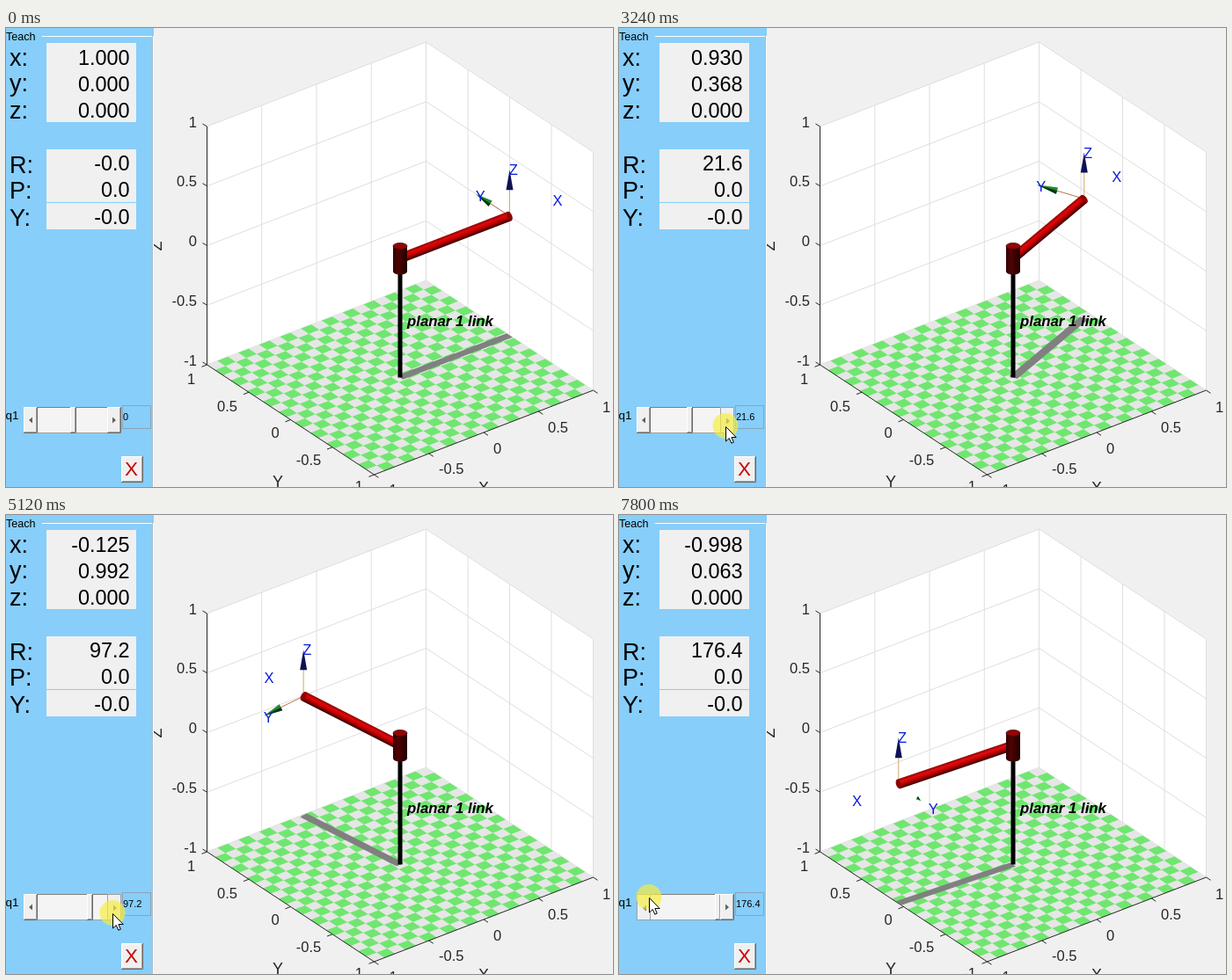
Animation of 690x522 px, one loop 8 s. Source, as an HTML page:

```html
<!DOCTYPE html>
<html lang="en">
<head>
<meta charset="utf-8">
<title>One-link arm</title>
<style>
html, body { margin: 0; width: 100%; height: 100%; overflow: hidden; background: #f0f0f0; }
svg { display: block; width: 690px; height: 522px; font-family: "Liberation Sans", Arial, sans-serif; }
.tick { font-size: 16.5px; fill: #262626; }
.title { font-size: 18px; fill: #262626; }
.name { font-size: 27px; }
.num { font-size: 23.4px; text-anchor: end; }
.axis { font-size: 16.5px; fill: #0a1ed8; }
</style>
</head>
<body>
<svg id="stage" viewBox="0 0 690 522"></svg>
<script>
const LOOP = 8000;
const TILES = 21;

// Slider steps: [time, joint angle]
const STEPS = [
  [0, 0], [1850, 3.6], [2310, 7.2], [2640, 10.8], [2790, 14.4], [2940, 18], [3100, 21.6],
  [3260, 25.2], [3430, 28.8], [3710, 32.4], [3830, 39.6], [3980, 46.8], [4140, 54],
  [4310, 61.2], [4520, 68.4], [4650, 75.6], [4770, 82.8], [4900, 90], [5020, 97.2],
  [5180, 104.4], [5340, 111.6], [5460, 118.8], [5590, 126], [5720, 133.2], [5860, 140.4],
  [6010, 147.6], [6180, 154.8], [6320, 162], [6450, 169.2], [6590, 176.4]
];
const ARM_LAG = 30, TEXT_LAG = 85;

const PRESSES = [[1820, 1970], [2280, 2410], [2610, 7080], [7800, LOOP]];

// Pointer path: [time, x, y]
const POINTER = [
  [1220, 146, 508], [1360, 130, 473], [1500, 121, 453], [7060, 121, 453],
  [7180, 80, 441], [7300, 41, 433], [7440, 41, 433], [7620, 34, 435]
];

const $ = id => document.getElementById(id);
const set = (id, attrs) => { for (const k in attrs) $(id).setAttribute(k, attrs[k]); };
const project = (x, y, z) => [448 + 124.5 * x - 95 * y, 397.5 - 48 * x - 62.5 * y - 135.5 * (z + 1)];
const pathOf = (...pts) => 'M' + pts.map(p => p.map(n => n.toFixed(2)).join(' ')).join('L');
const along = (p, v, k) => [p[0] + v[0] * k, p[1] + v[1] * k];
const text = (x, y, s, cls = '', extra = '') => `<text x="${x}" y="${y}" class="${cls}" ${extra}>${s}</text>`;
const rect = (x, y, w, h, fill, extra = '') =>
  `<rect x="${x}" y="${y}" width="${w}" height="${h}" fill="${fill}" ${extra}/>`;
const line = (d, stroke, w = 1) => `<path d="${d}" fill="none" stroke="${stroke}" stroke-width="${w}"/>`;

function floor() {
  const size = 2 / TILES;
  let d = '';
  for (let i = 0; i < TILES; i++) {
    for (let j = 0; j < TILES; j++) {
      if ((i + j) % 2 === 0) continue;
      const x = i * size - 1, y = j * size - 1;
      d += pathOf(project(x, y, -1), project(x + size, y, -1),
        project(x + size, y + size, -1), project(x, y + size, -1)) + 'Z';
    }
  }
  const all = pathOf(project(-1, -1, -1), project(1, -1, -1), project(1, 1, -1), project(-1, 1, -1)) + 'Z';
  return `<path d="${all}" fill="#e6e6e6"/><path d="${d}" fill="#70e670"/>`;
}

function axes() {
  const walls = pathOf(project(-1, 1, -1), project(-1, 1, 1), project(1, 1, 1),
    project(1, -1, 1), project(1, -1, -1), project(1, 1, -1)) + 'Z';
  let grid = '', ticks = '', labels = '';
  for (let i = 0; i < 5; i++) {
    const v = i / 2 - 1, z = project(-1, 1, v), y = project(-1, v, -1), x = project(v, -1, -1);
    grid += pathOf(project(v, 1, -1), project(v, 1, 1)) + pathOf(project(1, v, -1), project(1, v, 1)) +
      pathOf(project(-1, 1, v), project(1, 1, v), project(1, -1, v));
    ticks += pathOf(z, [z[0] - 5, z[1] - 3]) + pathOf(y, [y[0] - 6, y[1] + 2.3]) + pathOf(x, [x[0] + 5, x[1] + 3.3]);
    labels += text(217, z[1] + .5, v, 'tick', 'text-anchor="end"') +
      text(406 - 47.7 * i, 527 - 30.4 * i, v, 'tick', 'text-anchor="end"') +
      text(430 + 62 * i, 531 - 23.6 * i, v, 'tick');
  }
  const edges = pathOf(project(-1, 1, 1), project(-1, 1, -1), project(-1, -1, -1), project(1, -1, -1));
  return `<path d="${walls}" fill="#fff"/>` + line(grid, '#dedede') + floor() +
    line(edges + ticks, '#262626') + labels +
    text(303, 522, 'Y', 'title') + text(537, 529, 'X', 'title') +
    text(0, 0, 'Z', 'title', 'transform="translate(176.5 253.5) rotate(-90)"');
}

function robot() {
  return `<path id="shadow" fill="#808080"/>` +
    line('M448 274V397.5', '#000', 5) +
    text(456, 339, 'planar 1 link', '', 'font-size="16.8" font-weight="bold" font-style="italic"') +
    `<path id="lineX" stroke="#3048d0"/>
    <path id="lineY" stroke="#b8704a"/>
    <path id="lineZ" stroke="#d0a868"/>
    <path id="coneX" fill="#d01010"/>
    <path id="coneY" fill="#1c8a2c"/><path id="sideY" fill="#0c3414"/>
    <path id="coneZ" fill="#101058"/>
    <g id="arm"><rect id="rod" y="-5.5" height="11" fill="url(#red)"/>
    <ellipse id="cap" rx="2.8" ry="5.5" fill="#8c0404"/></g>
    <path d="M440 248V277A8 3.5 0 0 0 456 277V248Z" fill="url(#maroon)"/>
    <ellipse cx="448" cy="248" rx="8" ry="3.6" fill="#900606" stroke="#400000" stroke-width=".7"/>` +
    ['X', 'Y', 'Z'].map(s => text(0, 0, s, 'axis', `id="tag${s}"`)).join('');
}

function bevel(x, y, w, h) {
  return rect(x, y, w, h, '#f0f0f0') +
    line(`M${x + .5} ${y + h - 1}V${y + .5}H${x + w - 1}`, '#fff') +
    line(`M${x + w - 1.5} ${y + 1}V${y + h - 1.5}H${x + 1}`, '#a0a0a0') +
    line(`M${x + w - .5} ${y}V${y + h - .5}H${x}`, '#696969');
}

// Slider end button with a raised and a pressed face; dir is the arrow's direction
function arrowButton(id, x, dir) {
  const arrow = (cx, cy) =>
    `<path d="M${cx - 2 * dir} ${cy - 3.5}V${cy + 3.5}L${cx + 2 * dir} ${cy}Z" fill="#606060"/>`;
  return bevel(x, 431, 16, 30) + arrow(x + 8, 446) +
    `<g id="${id}">${rect(x + .5, 431.5, 15, 29, '#f0f0f0', 'stroke="#a0a0a0"')}${arrow(x + 9, 447)}</g>`;
}

function panel() {
  const names = [['x', 43], ['y', 72], ['z', 103], ['R', 164.5], ['P', 194], ['Y', 225]];
  const values = [['1.000', 41.8], ['0.000', 71.5], ['0.000', 101.5], ['-0.0', 162.3], ['0.0', 192.3], ['-0.0', 223.3]];
  return rect(0, 0, 168, 522, '#87cefa') +
    line('M41 8.5H167M166.5 9V522', '#a9bfcc') + line('M41 9.5H166M167.5 9V522', '#fff') +
    text(0, 14, 'Teach', '', 'font-size="12.6"') +
    rect(46, 17, 102, 90, '#f0f0f0') + rect(46, 138, 102, 91, '#f0f0f0') + rect(46, 198, 102, 1, '#87cefa') +
    names.map(([s, y]) => text(4, y, s + ':', 'name')).join('') +
    values.map(([s, y], i) => text(140.5, y, s, 'num', `id="val${i}"`)).join('') +
    text(-.5, 445, 'q1', '', 'font-size="13.5"') +
    rect(132.5, 429.5, 32, 26, 'none', 'stroke="#8aa4b6"') +
    text(133, 446, '0', '', 'id="angle" font-size="11"') +
    rect(20, 431, 111, 30, '#f4f4f4') + line('M36 431.5H115', '#808080') + line('M36 460.5H115', '#a0a0a0') +
    `<g id="thumb">${bevel(0, 431, 7, 30)}</g>` +
    arrowButton('less', 20, -1) + arrowButton('more', 115, 1) +
    bevel(131, 487, 25, 30) + text(142.5, 509, 'X', '', 'font-size="22.5" fill="#c80000" text-anchor="middle"');
}

$('stage').innerHTML = `<defs>
  <linearGradient id="red" x2="0" y2="1">
    <stop offset="0" stop-color="#8c0000"/><stop id="shine" offset=".3" stop-color="#e00808"/>
    <stop offset=".62" stop-color="#b80000"/><stop offset="1" stop-color="#2c0000"/>
  </linearGradient>
  <linearGradient id="maroon">
    <stop offset="0" stop-color="#300000"/><stop offset=".35" stop-color="#500303"/><stop offset="1" stop-color="#220000"/>
  </linearGradient></defs>` +
  rect(0, 0, 690, 522, '#f0f0f0') + axes() + robot() + panel() +
  `<circle id="press" r="14.5" fill="#f6ee3c" fill-opacity=".68"/>
  <path id="pointer" d="M0 0V16.5L3.8 13L6.3 18.7L8.8 17.6L6.4 12H11.7Z"
    fill="#fff" stroke="#000" stroke-linejoin="round"/>`;

function angleAt(t) {
  let q = 0;
  for (const [start, value] of STEPS) if (t >= start) q = value;
  return q;
}

function pointerAt(t) {
  const i = POINTER.findIndex(p => p[0] > t);
  if (i < 0) return POINTER[POINTER.length - 1].slice(1);
  const [t0, x0, y0] = POINTER[Math.max(0, i - 1)], [t1, x1, y1] = POINTER[i];
  const k = i ? (t - t0) / (t1 - t0) : 0;
  return [x0 + (x1 - x0) * k, y0 + (y1 - y0) * k];
}

function cone(tip, v, from, to, half) {
  const len = Math.hypot(...v) || 1, n = [-v[1] / len, v[0] / len];
  const base = along(tip, v, from), apex = along(tip, v, to);
  const a = along(base, n, half), b = along(base, n, -half);
  return [pathOf(a, apex, b) + 'Z', pathOf(base, apex, b) + 'Z'];
}

function drawArm(q) {
  const a = q * Math.PI / 180, c = Math.cos(a), s = Math.sin(a);
  const tip = project(c, s, 0);
  const vx = [124.5 * c - 95 * s, -48 * c - 62.5 * s];
  const vy = [-124.5 * s - 95 * c, 48 * s - 62.5 * c];
  const vz = [0, -135.5];
  const len = Math.hypot(...vx), turn = Math.atan2(vx[1], vx[0]) * 180 / Math.PI;

  // The shadow is a flat strip lying on the floor
  const foot = project(0, 0, -1), end = project(c, s, -1), half = .035;
  set('shadow', { d: pathOf(along(foot, vy, half), along(end, vy, half), along(end, vy, -half), along(foot, vy, -half)) + 'Z' });

  set('arm', { transform: `translate(448 262) rotate(${turn}) scale(1 ${vx[0] < 0 ? -1 : 1})` });
  set('rod', { width: len });
  set('cap', { cx: len });
  const glow = Math.exp(-(((q - 150) / 16) ** 2)) * 85;
  set('shine', { 'stop-color': `rgb(${224 + glow * .3},${8 + glow},${8 + glow})` });

  const near = q > 140;
  set('lineX', { d: near && q < 166 ? pathOf(tip, along(tip, vx, .11)) : '' });
  set('lineY', { d: q < 166 ? pathOf(tip, along(tip, vy, near ? .21 : .24)) : '' });
  set('lineZ', { d: pathOf(tip, along(tip, vz, .24)) });
  const [full, side] = near ? cone(tip, vy, .24, .29, 2) : cone(tip, vy, .23, .4, 3.8);
  set('coneY', { d: full });
  set('sideY', { d: side });
  set('coneX', { d: q > 36 && q < 64 ? cone(tip, vx, .2, .38, 4)[0] : '' });
  set('coneZ', { d: cone(tip, vz, .22, .39, 4)[0] });
  [['X', vx], ['Y', vy], ['Z', vz]].forEach(([name, v]) => {
    const p = along(tip, v, .4);
    set('tag' + name, { x: p[0] - .8, y: p[1] + 7.5 });
  });
}

function drawPanel(q, slider) {
  const a = q * Math.PI / 180;
  $('val0').textContent = Math.cos(a).toFixed(3);
  $('val1').textContent = Math.sin(a).toFixed(3);
  $('val3').textContent = q ? q.toFixed(1) : '-0.0';
  $('angle').textContent = slider;
  set('thumb', { transform: `translate(${Math.round(72.7 + slider * .203)} 0)` });
}

function draw(t) {
  drawArm(angleAt(t - ARM_LAG));
  drawPanel(angleAt(t - TEXT_LAG), angleAt(t));
  const [x, y] = pointerAt(t);
  const down = PRESSES.some(([on, off]) => t >= on && t < off);
  const shown = on => on ? 'visible' : 'hidden';
  set('pointer', { transform: `translate(${x + .5} ${y + .5})`, visibility: shown(t >= 1220) });
  set('press', { cx: x, cy: y - .5, visibility: shown(down) });
  set('less', { visibility: shown(down && x < 75) });
  set('more', { visibility: shown(down && x > 75) });
}

const begin = performance.now();
function tick() {
  draw((performance.now() - begin) % LOOP);
  requestAnimationFrame(tick);
}
tick();
</script>
</body>
</html>
```
